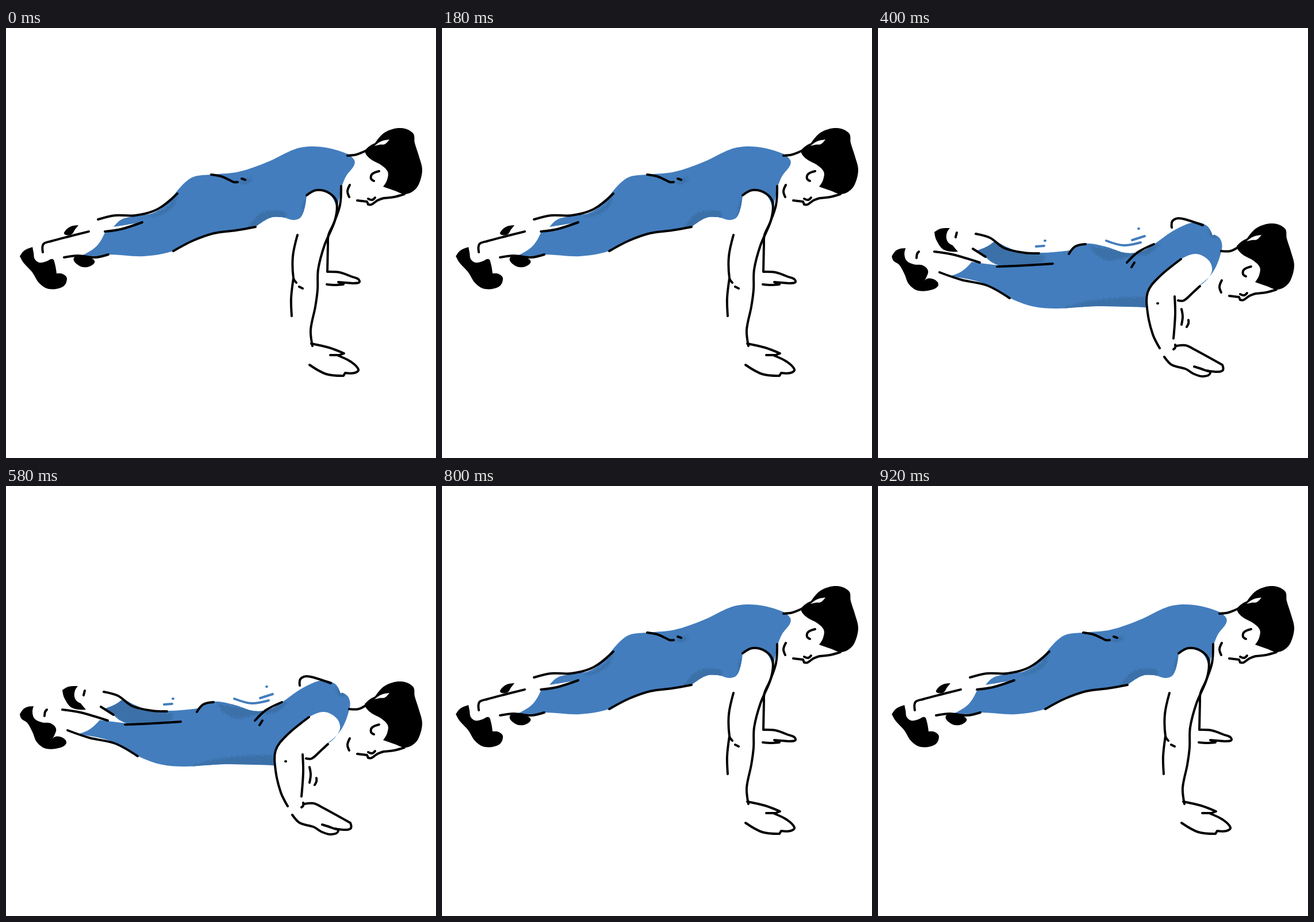
An HTML page that plays this animation: 748 px wide and 748 px high, repeating every 1 s.

```html
<!DOCTYPE html>
<html lang="en">
<head>
<meta charset="utf-8">
<title>Push-up</title>
<style>
  html, body { margin: 0; width: 100%; height: 100%; overflow: hidden; background: #fff; }
  svg { display: block; width: 100%; height: 100%; }
  .ink, .swish { fill: none; stroke: #000; stroke-width: 4; stroke-linecap: round; stroke-linejoin: round; }
  .swish { stroke: #437dbd; }
  .body { fill: #437dbd; }
  .shade { fill: #3a6fa8; }
  .gap { fill: #fff; }
</style>
</head>
<body>
<svg id="stage" viewBox="0 0 748 748" xmlns="http://www.w3.org/2000/svg">
  <defs>
    <filter id="grain" x="-20%" y="-40%" width="140%" height="180%">
      <feTurbulence type="fractalNoise" baseFrequency=".55" numOctaves="2" seed="4"/>
      <feDisplacementMap in="SourceGraphic" scale="15" xChannelSelector="R" yChannelSelector="G"/>
    </filter>
  </defs>
</svg>
<script>
const stage = document.getElementById("stage");

function add(parent, tag, attrs) {
  const el = document.createElementNS("http://www.w3.org/2000/svg", tag);
  for (const key in attrs) el.setAttribute(key, attrs[key]);
  return parent.appendChild(el);
}

// Smooth curve through "x,y" points; "!" marks a corner.
function curve(text, closed) {
  const pts = text.trim().split(/\s+/).map(s => {
    const [x, y] = s.split(",").map(parseFloat);
    return { x, y, corner: s.endsWith("!") };
  });
  const n = pts.length;
  const at = i => closed ? pts[(i + n) % n] : pts[i];

  function handle(i, step) {
    const p = at(i), a = at(i - step), b = at(i + step);
    if (p.corner || !a || !b) return null;
    const reach = Math.hypot(b.x - p.x, b.y - p.y) / 3;
    const span = Math.hypot(b.x - a.x, b.y - a.y) || 1;
    return { x: p.x + (b.x - a.x) / span * reach, y: p.y + (b.y - a.y) / span * reach };
  }
  const mid = (p, q) => ({ x: (p.x + q.x) / 2, y: (p.y + q.y) / 2 });

  let d = `M${pts[0].x} ${pts[0].y}`;
  for (let i = 0; i < (closed ? n : n - 1); i++) {
    const p = at(i), q = at(i + 1);
    const out = handle(i, 1), back = handle(i + 1, -1);
    const c1 = out || mid(p, back || q);
    const c2 = back || mid(q, out || p);
    d += `C${c1.x} ${c1.y} ${c2.x} ${c2.y} ${q.x} ${q.y}`;
  }
  return closed ? d + "Z" : d;
}

const fill = (parent, points, cls = "") => add(parent, "path", { d: curve(points, true), class: cls });
const line = (parent, strokes, cls = "ink") =>
  add(parent, "path", { d: strokes.split(";").map(s => curve(s, false)).join(""), class: cls });

function addHead(g, drop) {
  const head = add(g, "g", { transform: `translate(0 ${drop})` });
  fill(head, "624,213! 633,205 642,200! 660,181 687,174 708,183 711,200 718,222 724,247 718,272 708,284 694,289 676,283 656,276! 663,264 664,250 652,238 637,230 627,221");
  fill(head, "641,205! 653,197 667,194! 659,202 650,203", "gap");
  line(head, "649,249 637,254 635,262 640,266;598,273 594,284 597,294");
  line(head, "611,300 628,302! 630,307! 636,307 646,300 657,296! 675,294 693,289;630,297 637,299 642,295");
}

function newPose(drop, body) {
  const g = add(stage, "g", { visibility: "hidden" });
  const id = "clip" + drop;
  fill(add(g, "clipPath", { id }), body);
  fill(g, body, "body");
  const shading = add(g, "g", { "clip-path": `url(#${id})` });
  addHead(g, drop);
  return {
    g,
    shade: pts => fill(shading, pts, "shade").setAttribute("filter", "url(#grain)"),
    gap: pts => fill(g, pts, "gap"),
    shoe: pts => fill(g, pts),
    ink: pts => line(g, pts),
    swish: pts => line(g, pts, "swish")
  };
}

function raised() {
  const p = newPose(0, "594,219! 562,209 530,206 502,211 455,233 405,250 357,255 326,259 306,274 278,307 255,322 225,327 201,333 187,346! 237,338! 208,349 172,356! 158,379 134,395! 155,397 178,394 240,397 291,388 325,370 362,357 400,352 434,346! 460,330 480,329 500,334 512,330 519,315 523,291! 540,282 562,288 576,315! 584,276! 592,257 605,240 606,230");
  p.shade("398,267! 414,266 426,258! 424,268 414,271");
  p.shade("245,329! 278,314 297,290! 291,310 270,325");
  p.shade("420,348! 445,322 482,319 485,331 460,331 434,347");
  p.shade("513,328! 520,310 522,294! 515,312");
  // neck, back and legs
  p.ink("594,222 610,220 627,213");
  p.ink("357,255 374,258 390,265 396,268 403,268;410,262 416,264");
  p.ink("160,333 190,326 225,326 264,315 298,288");
  p.ink("172,354 200,350 237,338");
  p.ink("64,390 65,376 78,371 112,362 144,354");
  p.ink("101,399 125,396 155,399 178,394");
  p.ink("291,388 325,370 362,357 400,352 434,346");
  // arms and hands
  p.ink("523,291 540,282 562,287 575,303 572,335 554,378 543,420 542,455 538,485 530,525 533,553");
  p.ink("583,275 581,308 570,340 561,360 560,375! 559,424! 580,425 600,432 615,440 603,444! 578,442! 587,446! 572,447 558,446");
  p.ink("507,360 499,397 500,435 505,443;500,435 496,470 497,501;510,450 516,453");
  p.ink("531,549 562,556 588,566! 580,569! 564,569");
  p.ink("578,570 599,580 613,594 606,600 590,600! 587,605! 557,602 528,586");
  p.shoe("24,397! 32,387 46,381! 48,391 50,402 58,408 70,406 81,402 85,410 88,427! 99,428 106,436 99,450 75,454 58,444 45,424 31,409");
  p.shoe("101,356 111,346 126,343! 119,352! 114,359 104,360");
  p.shoe("118,400 136,398 154,405 145,415 128,414");
  return p.g;
}

function halfway() {
  const p = newPose(95, "600,320 591,298 565,291 525,294 488,306 450,321 415,324 390,319 365,313 341,319 316,336 285,350 250,353 225,354 208,360 182,380! 165,382! 151,401 131,414! 165,419 200,424 216,426 262,432 313,427 365,415 402,416 440,414 478,402 492,400 501,389 508,370 522,355 545,342 568,340 581,350 580,365 565,386! 582,370 590,352");
  p.shade("300,428! 340,407 400,405 486,401! 440,415 385,415");
  p.shade("184,379! 210,358 290,350! 246,362");
  p.shade("420,325! 460,319 494,303! 475,318");
  p.shade("566,384! 579,370 586,360");
  p.gap("207,379! 230,366 272,362! 243,371! 226,378");
  // back, neck and legs
  p.ink("416,324 448,318;435,331 458,325;601,318 615,315 627,308");
  p.ink("186,343 220,349 255,353 290,348 316,335");
  p.ink("193,331 208,331 221,334;224,321 231,323");
  p.ink("93,379 125,373 160,380 190,382 226,378");
  p.ink("243,371 275,362;126,414 160,418 195,423 216,426");
  p.ink("260,432 312,428 365,415 390,415");
  // arms and hands
  p.ink("522,355 543,341 567,337");
  p.ink("582,369 570,383 557,396 549,417 538,435 522,453 517,472 521,498 523,525");
  p.ink("489,416 477,437 475,460 485,468;474,457 487,515 515,574 533,593 557,602 585,605 589,600");
  p.ink("524,544 528,549 522,560;528,549 547,554 560,559 577,566 606,580! 603,583 613,594 602,598 583,597");
  p.ink("550,423 570,430 588,434 609,438 598,443! 583,441! 588,446! 570,444 555,439 541,433");
  p.ink("543,452 533,464;537,475 538,474;644,277 655,269 668,263;134,348 130,354 131,363");
  p.swish("401,267 416,260;327,310 340,302 357,299;567,280 572,282");
  p.swish("451,293 488,276 522,269;416,310 453,302 486,286");
  p.shoe("24,397! 33,386 45,383! 44,392 48,403 64,411! 60,408! 76,408 87,416 87,426 81,435! 95,431 107,434 106,444 82,453 59,446 49,430 41,412 29,406");
  p.shoe("99,347! 110,344 124,345! 118,355 121,373! 107,374! 105,360");
  return p.g;
}

function lowered() {
  const p = newPose(166, "163,407! 146,423 124,432! 180,443 230,470 268,484 310,488 380,484 468,486! 471,454 490,434 527,402! 553,393 575,404 581,422 570,440 556,450! 583,424 598,385 596,368 586,360 582,361! 572,344 550,338 515,352 480,376 457,389 430,391 395,380 360,375 333,387! 281,391 240,387 204,370! 190,380 172,387! 187,398! 197,407 210,413! 178,409");
  p.shade("368,378! 402,385 445,389 492,374! 470,393 440,397 400,404 378,393");
  p.shade("320,487! 380,473 467,468! 468,486!");
  p.shade("202,371! 240,388 291,395! 284,408 245,413 205,409 173,387!");
  p.shade("556,449! 574,440 582,428! 572,444");
  p.shade("573,350! 594,361! 583,366");
  // shoulder, neck, back and legs
  p.ink("511,347 512,336 522,331 535,333 565,343;597,388 613,388 627,381");
  p.ink("332,393 343,380 361,376;433,408 452,390 480,376;441,416 446,408");
  p.ink("170,358 195,365 220,383 255,391 280,392;165,384 187,398");
  p.ink("98,389 130,394 177,408;207,415 255,413 304,410");
  p.ink("107,425 145,438 190,448 229,470");
  // arm and hand
  p.ink("527,402 487,435 469,460 469,495 478,533 490,557");
  p.ink("516,467 517,498 514,540;522,474 532,474 548,460 560,449");
  p.ink("486,479 487,479;528,489 530,502 528,516;540,508 540,514 537,520");
  p.ink("517,551 517,556 514,559;519,553 535,552 550,559 599,586! 600,595 592,598 571,596");
  p.ink("550,589 568,595 578,600 566,606 550,602 535,593 511,586 498,572");
  p.ink("137,356 135,364;71,389 68,393 67,400");
  p.swish("275,380 289,379;290,370 291,370;397,370 427,378 457,373;442,369 464,362;453,349 454,349");
  p.shoe("24,397! 33,386 48,383! 46,394 50,405 62,411 78,413 87,422 84,434 78,443! 86,436 99,438 105,447 95,455 70,457 54,446 46,428 37,412 27,405");
  p.shoe("98,355! 109,349 125,348! 120,356 119,366 123,374 130,378! 133,382 139,389! 115,386 102,370");
  return p.g;
}

const poses = [raised(), halfway(), lowered()];

function poseAt(t) {
  if (t < 300 || t >= 800) return 0;
  return t >= 400 && t < 700 ? 2 : 1;
}

function draw(ms) {
  const current = poseAt(ms % 1000);
  poses.forEach((g, i) => g.setAttribute("visibility", i === current ? "visible" : "hidden"));
}

const start = performance.now();
function tick() {
  draw(performance.now() - start);
  requestAnimationFrame(tick);
}
tick();
</script>
</body>
</html>
```
